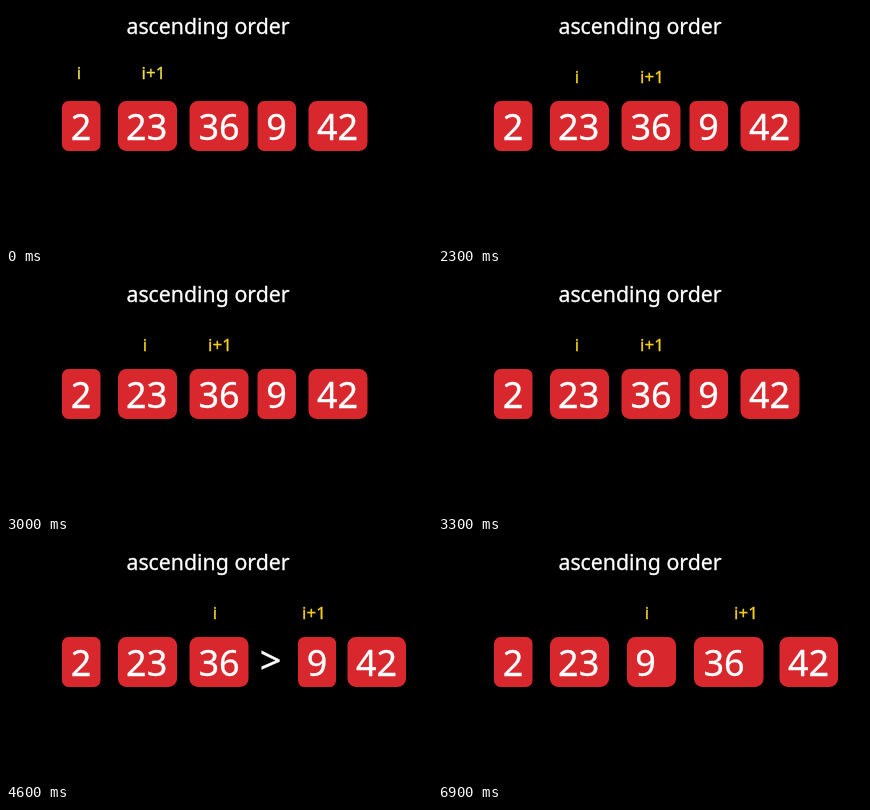
Recreate the animation shown at these times as an HTML page. Size 426 by 240 pixels, loop 8 s.

```html
<!DOCTYPE html>
<html lang="en">
<head>
<meta charset="utf-8">
<title>Ascending order</title>
<style>
  html, body { margin: 0; width: 100%; height: 100%; overflow: hidden; background: #000; }
  svg { display: block; width: 100%; height: 100%; }
  text {
    font-family: "Noto Sans", "Open Sans", sans-serif;
    text-anchor: middle;
    fill: currentColor;
    stroke: currentColor;
    stroke-width: .3px;
    color: #fff;
  }
  .title { font-size: 21.3px; }
  .number { font-size: 36px; }
  .sign { font-size: 38px; }
  .label { font-size: 17px; }
  rect { fill: #d9282d; }
</style>
</head>
<body>
<svg viewBox="0 0 426 240">
  <text class="title" x="202" y="27.5">ascending order</text>
  <g id="scene"></g>
</svg>
<script>
const LOOP = 8000;
const scene = document.getElementById("scene");

// value, box left, box width, text centre
const two = [2, 56, 38.5, 75];
const twentyThree = [23, 112, 59, 140.7];
const thirtySix = [36, 183.5, 59, 213];
const start = [two, twentyThree, thirtySix, [9, 251.5, 38.5, 270.5], [42, 302.5, 59, 331.5]];
const last = [42, 341.5, 58.5, 370.5];
const compare = [two, twentyThree, thirtySix, [9, 292, 38, 311], last];
const swapped = [two, twentyThree, [9, 189, 49, 207.5], [36, 256, 69.5, 286], last];

const steps = [
  { at: 0, boxes: start, i: 73, next: 147.5, y: 73, color: "#f0df45" },
  { at: 2300, boxes: start, i: 139, next: 214, y: 76.5, color: "#f8d01c" },
  { at: 4500, boxes: compare, i: 209, next: 308, y: 76.5, color: "#f8d01c", sign: 264.7 },
  { at: 6800, boxes: swapped, i: 209, next: 308, y: 76.5, color: "#f8d01c" }
];

const label = (s, x, y, color) =>
  `<text class="label" x="${x}" y="${y}" style="color:${color}">${s}</text>`;

const box = ([value, left, width, centre]) =>
  `<rect x="${left}" y="95" width="${width}" height="50" rx="${Math.min(width, 50) / 6}"/>` +
  `<text class="number" x="${centre}" y="134">${value}</text>`;

function draw(step) {
  scene.innerHTML =
    label("i", step.i, step.y, step.color) +
    label("i+1", step.next, step.y, step.color) +
    step.boxes.map(box).join("") +
    (step.sign ? `<text class="sign" x="${step.sign}" y="131.5">&gt;</text>` : "");
}

let shown;
const origin = performance.now();

function tick(now) {
  const t = Math.max(0, now - origin) % LOOP;
  const step = steps.findLast(s => s.at <= t);
  if (step !== shown) draw(shown = step);
  requestAnimationFrame(tick);
}
tick(origin);
</script>
</body>
</html>
```
